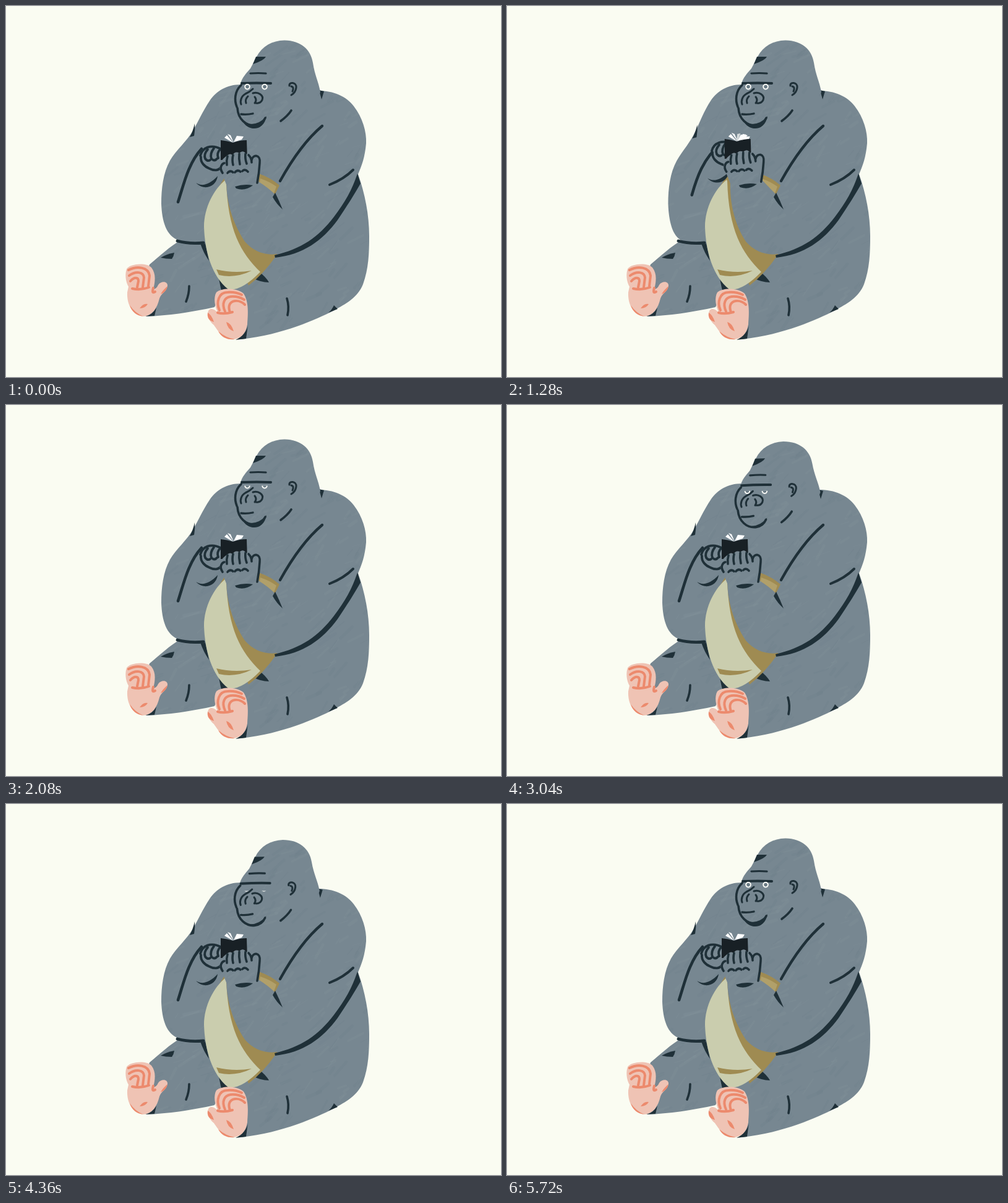
An HTML page with a canvas that plays this animation: 800x600 px, repeating every 5.76 s.

```html
<!DOCTYPE html>
<html lang="en">
<head>
<meta charset="utf-8">
<title>Reading gorilla</title>
<style>
html, body { margin: 0; width: 100%; height: 100%; overflow: hidden; background: #fafcf2; }
canvas { display: block; width: 800px; height: 600px; }
</style>
</head>
<body>
<canvas id="stage" width="800" height="600"></canvas>
<script>
const LOOP = 5760, STEP = 40;
const PAPER = '#fafcf2', DARK = '#1f3038', FUR = '#778791', BELLY = '#cacdae',
  OLIVE = '#9f8b52', GOLD = '#b1a06a', PINK = '#efc3b4', CORAL = '#ec8a6d', BOOK = '#182025';
const ctx = document.getElementById('stage').getContext('2d');
const fur = makeFur();

// Painted surface: a flat tone with faint, seeded brush strokes.
function makeFur() {
  const tile = document.createElement('canvas');
  tile.width = 800;
  tile.height = 600;
  const g = tile.getContext('2d');
  let seed = 11;
  const rnd = () => (seed = (seed * 16807) % 2147483647) / 2147483647;
  g.fillStyle = FUR;
  g.fillRect(0, 0, 800, 600);
  g.lineCap = 'round';
  for (let i = 0; i < 500; i++) {
    const x = 200 + rnd() * 400, y = 50 + rnd() * 500;
    const a = -1.1 + rnd() * 0.9, len = 6 + rnd() * 26;
    g.strokeStyle = rnd() < 0.55 ? 'rgba(165,183,190,.06)' : 'rgba(80,100,113,.05)';
    g.lineWidth = 1 + rnd() * 5;
    g.beginPath();
    g.moveTo(x, y);
    g.lineTo(x + Math.cos(a) * len, y + Math.sin(a) * len);
    g.stroke();
  }
  return g.createPattern(tile, 'repeat');
}

const clamp = x => Math.max(0, Math.min(1, x));
const ease = (t, from, to) => {
  const x = clamp((t - from) / (to - from));
  return x * x * (3 - 2 * x);
};

function fill(color, ...paths) {
  ctx.fillStyle = color;
  for (const d of paths) ctx.fill(new Path2D(d));
}

function line(width, color, ...paths) {
  ctx.strokeStyle = color;
  ctx.lineWidth = width;
  for (const d of paths) ctx.stroke(new Path2D(d));
}

function shifted(x, y, draw) {
  ctx.save();
  ctx.translate(x, y);
  draw();
  ctx.restore();
}

// The reading arm goes rest -> lift -> turn -> rest.
function armMix(t) {
  const lift = ease(t, 600, 960), turn = ease(t, 960, 1170), back = ease(t, 1200, 1760);
  const c = turn * (1 - back), b = lift * (1 - turn);
  return (rest, up, over) => rest + (up - rest) * b + (over - rest) * c;
}

const headDrop = t => ease(t, 2080, 2280) - ease(t, 3040, 3360)
  + ease(t, 4200, 4440) - ease(t, 5480, 5720);

const BLINKS = [[40, 200], [2080, 2280], [3040, 3360], [3520, 3640], [3760, 3880],
  [4200, 4440], [4760, 4920], [5040, 5200], [5480, 5720]];

function lidAt(t) {
  const span = BLINKS.find(([a, b]) => t >= a && t < b);
  if (!span) return 0;
  return t === span[0] || t === span[1] - STEP ? 0.48 : 0.86;
}

function drawBody() {
  fill(fur,
    'M285 377C264 389 248 405 232 418L215 470 226 502C262 501 300 495 337 487L348 462 340 380Z',
    'M374 140L505 137C529 137 550 146 562 162C576 180 583 203 582 222C580 245 575 258 569 272' +
    'C580 303 587 338 587 372C587 400 586 425 577 450C568 472 550 481 529 493' +
    'C500 507 450 531 380 539L365 470 330 440 320 380 320 220Z');
  fill(DARK,
    'M272 399Q260 401 250 407Q258 409 268 409Q271 405 272 399Z',
    'M243 488Q237 499 226 502L240 501Z',
    'M530 484Q527 491 521 496L536 490Z',
    'M314 384L321 379 328 412Q319 399 314 384Z',
    'M344 441L348 461 364 459Z',
    'M409 430Q420 438 425 447Q411 447 397 439Z');
  line(3.6, DARK, 'M296 453Q296 466 291 478', 'M454 473Q458 486 455 500');
}

function drawFarArm(mix) {
  const o = mix(0, 0.5, 10);
  fill(fur, `M380 127C356 127 340 138 330 152C318 170 ${309 + o * .2} 190 ${302 + o * .3} 202
    C${291 + o * .6} 220 ${275 + o} 233 ${265 + o} 250C${254 + o} 270 ${251 + o} 295 ${251 + o} 320
    C${252 + o} 348 ${259 + o * .9} 372 ${279 + o * .3} 379Q300 386 321 385L345 330 375 210Z`);
  shifted(o * .25, o * .25, () => fill(DARK, 'M305 190Q302 203 297 212L304 210Q306 200 305 190Z'));
  line(4.8, DARK, 'M277 380Q295 385 319 383');
  line(4.6, DARK, `M${mix(278, 277, 300)} ${mix(317, 309, 305)}
    C${mix(287, 287, 307)} ${mix(290, 281, 280)} ${mix(294, 294, 318)} ${mix(255, 243, 245)}
    ${mix(316, 317, 348)} ${mix(231, 224, 222)}`);
}

function drawBelly() {
  fill(OLIVE, 'M345 291L357 271 411 272Q428 278 442 290L434 306 438 402Q416 434 392 452L345 340Z');
  fill(GOLD, 'M411 279Q426 284 437 292L433 303 409 290Z');
  fill(BELLY, 'M355 281C336 296 320 326 320 357C321 396 333 438 359 458' +
    'Q380 462 411 430C380 400 358 362 356 283Z');
  fill(OLIVE, 'M340 426Q368 433 397 428Q371 441 344 435Z');
}

function drawFarHand(mix) {
  shifted(mix(0, -4, 18), mix(0, -7, -8), () => {
    fill(fur, 'M314 241C317 226 342 222 350 235L349 263C339 271 319 264 314 241Z');
    line(3.8, DARK,
      'M314 242C317 229 331 223 347 231',
      'M315 244C314 253 321 260 329 263C337 267 344 266 347 261',
      'M326 232Q319 240 322 247Q326 252 330 249',
      'M336 230Q329 239 332 247Q337 252 341 247',
      'M346 232Q340 238 343 246');
    fill(DARK, 'M307 286C316 292 328 290 342 275C340 292 321 300 307 286Z');
  });
}

function drawBook(mix) {
  const turn = mix(0, 0, 1);
  shifted(5 * turn, -2 * turn, () => {
    fill('#ffffff',
      'M367 221L353 213 357 209Z',
      'M368 221L358 207 363 209Z',
      'M368 220L373 210 384 211 381 216Z');
    if (turn > 0.05) {
      const tip = 370 + 10 * turn;
      fill('#d5dadb', `M366 221L${tip - 12} 209 ${tip - 7} 208 369 219Z`);
      fill('#ffffff', `M368 221L${tip - 3} 209 ${tip + 3} 210 372 218Z`);
      fill('#ffffff', 'M369 221L384 213 388 213 386 217Z');
    }
    fill(BOOK, 'M347 217Q357 218 367 221Q378 217 389 217L390 250 347 249Z');
  });
}

function drawNearArm(mix) {
  const x = mix(0, 0, 5), y = mix(0, 0, -2);
  fill(fur, `M${357 + x} ${274 + y}C${353 + x} 313 367 352 386 381C400 397 419 404 438 401
    L476 386 460 330 446 328 434 304Q424 294 ${408 + x} ${284 + y}Z`);
  fill(DARK, 'M435 302Q441 314 447 329Q437 320 431 309Z',
    'M434 403C477 393 505 374 530 341C548 317 559 298 568 271L573 287' +
    'C563 305 550 325 536 346C511 380 480 402 435 407Z');
  line(4.3, DARK, 'M511 194C486 215 463 247 443 283');
  line(4, DARK, 'M523 289Q546 280 561 265');
  shifted(x, y, () => {
    fill(fur, 'M349 271C341 260 348 248 356 243Q362 237 366 241Q371 234 377 238Q383 232 388 239' +
      'Q396 239 397 248C400 238 413 241 410 256L408 290 357 291Z');
    line(3.6, DARK,
      'M350 270C344 261 349 255 353 254',
      'M358 243Q356 250 357 257', 'M367 241Q365 249 367 257',
      'M377 239Q376 247 378 256', 'M387 239Q386 247 389 255',
      'M392 241Q397 246 397 253',
      'M358 270Q362 265 367 269', 'M370 269Q374 264 379 268', 'M382 267Q386 263 391 268',
      'M397 249C399 239 412 240 410 254Q409 271 406 286');
    fill(DARK, 'M370 292Q385 287 399 290Q386 300 372 295Z');
  });
}

function drawEye(x, y, lid) {
  ctx.save();
  ctx.beginPath();
  ctx.rect(x - 6, y - 5 + lid * 10, 12, 12);
  ctx.clip();
  for (const [r, color] of [[4.8, '#fbfcf8'], [2.8, '#697a84']]) {
    ctx.beginPath();
    ctx.arc(x, y, r, 0, 7);
    ctx.fillStyle = color;
    ctx.fill();
  }
  ctx.restore();
}

function drawHead(drop, lid) {
  shifted(-3 * drop, drop, () => fill(DARK, 'M506 136L514 138 510 151Z'));
  shifted(450 - 2 * drop, 120 + 3.5 * drop, () => {
    ctx.rotate(-0.025 * drop);
    ctx.translate(-450, -120);
    fill(fur, 'M379 126C381 116 389 108 395 101L405 82C414 65 430 56 450 55.5' +
      'C477 56 493 71 496 92C499 112 505 122 508 139L500 160 430 190 400 195' +
      'C384 193 373 180 374 164C369 153 370 139 379 126Z');
    fill(DARK, 'M404 82L420 82Q417 88 399 94Z');
    line(3.2, DARK, 'M395 109Q408 108 420 109');
    line(4, DARK, 'M381 125Q405 124 428 125');
    line(3.6, DARK,
      'M380 128C369 138 369 153 373 163',
      'M374 165C375 183 388 194 402 193Q414 192 419 181',
      'M461 169Q455 178 444 186');
    fill(DARK, `M384 189C394 ${203 - 8 * drop} 417 ${202 - 8 * drop} 421 178Q406 196 384 189Z`);
    line(3, DARK,
      'M458 129C457 122 470 123 469 132Q468 140 461 144',
      'M461 130Q466 131 463 138');
    shifted(0, 0.6 * drop, () => {
      line(3, DARK,
        'M399 134Q394 139 387 142C380 146 378 154 380 159',
        'M399 141C408 138 417 145 414 152Q411 158 404 157',
        'M391 146Q386 151 388 157', 'M402 147Q406 152 402 157');
      line(3.3, DARK, 'M380 175Q390 176 399 174');
    });
    drawEye(390, 130.6 + 3.6 * drop, lid);
    drawEye(418, 130.6 + 4.2 * drop, lid);
  });
}

function drawFeet() {
  fill(DARK, 'M391 515Q389 531 371 540L388 538Z');
  fill(PINK,
    'M195 425C200 417 227 414 235 423C243 433 241 447 238 458Q243 458 246 451' +
    'C251 444 262 445 261 453C259 463 251 464 248 473C244 490 236 500 223 502' +
    'C205 500 195 484 196 463L198 454C193 446 192 433 195 425Z',
    'M340 463C349 456 371 455 384 465C393 479 391 500 390 515C387 532 378 539 364 539' +
    'C350 538 343 526 336 516C325 507 323 492 331 490Q337 489 343 497C337 486 335 471 340 463Z');
  fill(CORAL,
    'M261 453Q259 463 250 466Q253 460 261 453Z',
    'M216 489Q222 480 229 482Q225 489 216 489Z',
    'M200 484Q209 497 222 502Q205 500 200 484Z',
    'M326 496Q324 508 336 511Q332 499 326 496Z',
    'M356 511Q364 513 368 526Q358 523 356 511Z',
    'M343 526Q356 537 370 539Q351 541 343 526Z');
  line(4, CORAL,
    'M198 427C212 420 230 422 232 436L230 453',
    'M199 436C210 428 222 430 223 439L221 455',
    'M201 445C207 438 214 438 214 445L212 455',
    'M204 457Q218 460 231 455',
    'M238 456Q235 466 241 462',
    'M345 492C339 479 344 463 358 463Q370 462 381 467',
    'M354 494C348 481 353 471 363 470Q375 469 385 475',
    'M362 495C358 485 362 478 370 477Q379 476 386 483',
    'M342 496Q352 499 366 495');
}

function draw(t) {
  const mix = armMix(t);
  ctx.fillStyle = PAPER;
  ctx.fillRect(0, 0, 800, 600);
  ctx.lineCap = ctx.lineJoin = 'round';
  drawBody();
  drawFarArm(mix);
  drawBelly();
  drawFarHand(mix);
  drawBook(mix);
  drawNearArm(mix);
  drawHead(headDrop(t), lidAt(t));
  drawFeet();
}

const start = performance.now();
function tick() {
  const t = (performance.now() - start) % LOOP;
  draw(Math.floor(t / STEP) * STEP);
  requestAnimationFrame(tick);
}
tick();
</script>
</body>
</html>
```
